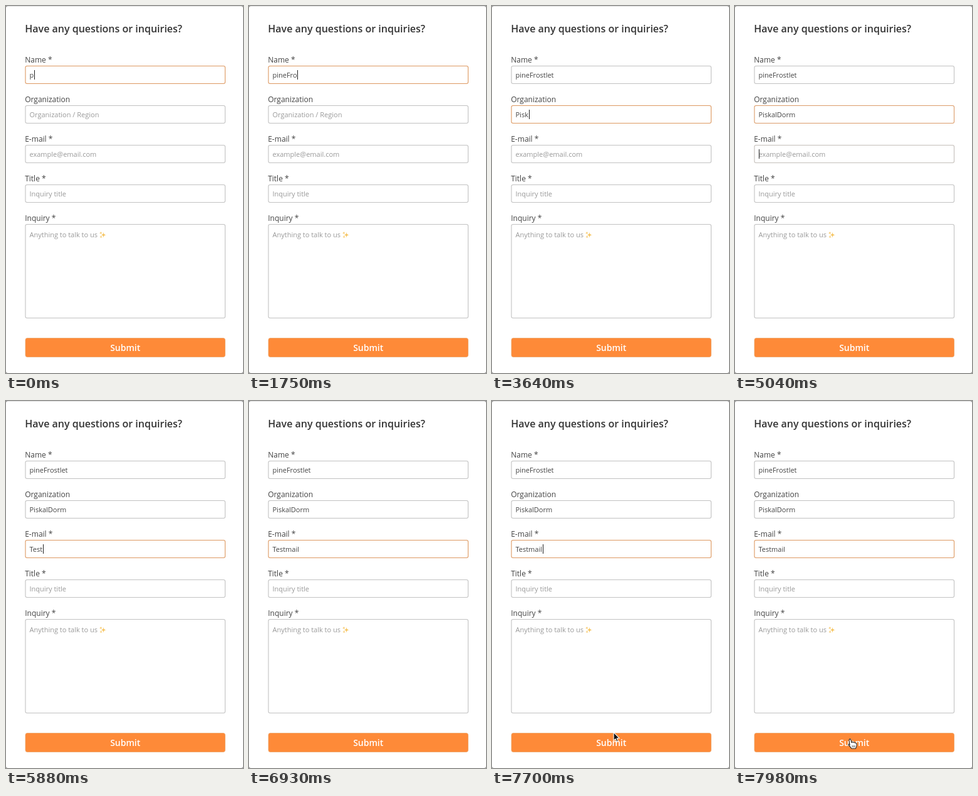
These frames come from a looping animation (378 by 584 pixels, 8000 ms). An HTML page with a canvas:

```html
<!DOCTYPE html>
<html lang="en">
<head>
<meta charset="utf-8">
<title>Inquiry form</title>
<style>
html, body { margin: 0; width: 100%; height: 100%; overflow: hidden; background: #fff; }
canvas { display: block; width: 378px; height: 584px; }
</style>
</head>
<body>
<canvas id="stage" width="378" height="584"></canvas>
<script>
const ctx = document.getElementById('stage').getContext('2d');
const LOOP = 8000, STEP = 70;
const FAMILY = '"Open Sans", "Noto Sans", sans-serif';
const GREY = [194, 194, 194], ORANGE = [221, 153, 98];
const TEXT_X = 37.5;

// keys: the time at which each character appears
const fields = [
  { label: 'Name *', y: 95, h: 28, hint: '', text: 'pineFrostlet', focus: -1000, blur: 2940,
    keys: [0, 420, 840, 980, 1330, 1470, 1750, 1960, 2100, 2240, 2310, 2450] },
  { label: 'Organization', y: 158, h: 28, hint: 'Organization / Region', text: 'PiskalDorm', focus: 2940, blur: 4970,
    keys: [3290, 3360, 3500, 3570, 3710, 3780, 4340, 4480, 4620, 4760] },
  { label: 'E-mail *', y: 221, h: 28, hint: 'example@email.com', text: 'Testmail', focus: 4970, blur: 1e6,
    keys: [5460, 5600, 5740, 5880, 6090, 6160, 6300, 6370] },
  { label: 'Title *', y: 284, h: 28, hint: 'Inquiry title' },
  { label: 'Inquiry *', y: 347, h: 149, hint: 'Anything to talk to us' }
];

// time, x, y of the mouse pointer
const path = [
  [7000, 207, 169], [7070, 207, 222], [7140, 208, 300], [7210, 210, 385], [7280, 211, 442],
  [7420, 209, 474], [7560, 202, 506], [7770, 190, 538], [7980, 187, 545]
];

const clamp = v => Math.max(0, Math.min(1, v));
const smooth = v => v * v * (3 - 2 * v);
const fade = (t, start) => smooth(clamp((t - start - 30) / 230));
const mix = (a, b, k) => `rgb(${a.map((v, i) => Math.round(v + (b[i] - v) * k))})`;

function write(text, x, y, size, color, weight = 400, align = 'left') {
  ctx.font = `${weight} ${size}px ${FAMILY}`;
  ctx.fillStyle = color;
  ctx.textAlign = align;
  ctx.fillText(text, x, y);
}

function box(x, y, w, h, r) {
  ctx.beginPath();
  ctx.roundRect(x, y, w, h, r);
}

function polygon(points) {
  ctx.beginPath();
  points.forEach(([x, y]) => ctx.lineTo(x, y));
  ctx.closePath();
}

function sparkle(x, y, r) {
  ctx.beginPath();
  ctx.moveTo(x, y - r);
  for (const [dx, dy] of [[r, 0], [0, r], [-r, 0], [0, -r]]) {
    ctx.quadraticCurveTo(x, y, x + dx, y + dy);
  }
  ctx.fillStyle = '#f6c766';
  ctx.fill();
}

function caretOn(t) {
  return t < 6930 || (t >= 7490 && t < 7980);
}

function drawField(f, t) {
  const { y, h, text = '', keys = [] } = f;
  write(f.label, 30.2, y - 5, 12, '#444');
  const glow = keys.length ? fade(t, f.focus) - fade(t, f.blur) : 0;
  box(31, y + 0.5, 318.5, h, 2.5);
  ctx.fillStyle = '#fff';
  ctx.fill();
  ctx.strokeStyle = mix(GREY, ORANGE, glow);
  ctx.lineWidth = 1.1;
  ctx.stroke();

  const typed = text.slice(0, keys.filter(k => k <= t).length);
  const baseline = y + (h > 100 ? 21 : 19);
  write(typed || f.hint, TEXT_X, baseline, 11, typed ? '#444' : '#999');
  if (keys.length && t >= f.focus && t < f.blur && caretOn(t)) {
    const x = Math.round(TEXT_X + ctx.measureText(typed).width * (typed ? 1 : 0) + 0.8);
    ctx.fillStyle = '#222';
    ctx.fillRect(x, y + 7, 1, 15);
  }
}

function drawButton() {
  box(31, 528.5, 318.5, 30, 3);
  ctx.fillStyle = '#fe8a38';
  ctx.fill();
  ctx.strokeStyle = '#eba468';
  ctx.lineWidth = 0.8;
  ctx.stroke();
  write('Submit', 190.2, 549, 14, '#fff', 600, 'center');
}

function drawBeam() {
  for (const [color, width] of [['#fff', 3], ['#222', 1.3]]) {
    ctx.beginPath();
    for (const s of [-1, 1]) {
      ctx.moveTo(-3.5, s * 7);
      ctx.quadraticCurveTo(0, s * 7, 0, s * 5);
      ctx.quadraticCurveTo(0, s * 7, 3.5, s * 7);
    }
    ctx.moveTo(0, -5.5);
    ctx.lineTo(0, 5.5);
    ctx.moveTo(-2, 2.5);
    ctx.lineTo(2, 2.5);
    ctx.strokeStyle = color;
    ctx.lineWidth = width;
    ctx.stroke();
  }
}

function outlined(fill, line) {
  ctx.lineJoin = 'round';
  ctx.lineWidth = 1.1;
  ctx.fillStyle = fill;
  ctx.strokeStyle = line;
  ctx.fill();
  ctx.stroke();
}

function drawArrow() {
  polygon([[0, 0], [0, 13], [3, 10.3], [5, 15], [7.2, 14], [5.2, 9.5], [9.2, 9.2]]);
  outlined('#111', '#fff');
}

function drawHand() {
  ctx.beginPath();
  ctx.moveTo(-4, 3);
  ctx.lineTo(-5, -5.5);
  ctx.quadraticCurveTo(-4, -8.5, -2.2, -6);
  ctx.lineTo(-1, -1.5);
  for (const [x, y] of [[2, -1.6], [4.5, -0.8], [7, 0.4]]) {
    ctx.quadraticCurveTo(x - 1, y - 1.8, x, y);
  }
  ctx.quadraticCurveTo(7.8, 4, 5.5, 8);
  ctx.lineTo(-1.2, 8);
  ctx.quadraticCurveTo(-3, 5, -6, 2.6);
  ctx.quadraticCurveTo(-6.5, 0, -4, 1.8);
  ctx.closePath();
  outlined('#fff', '#222');
  ctx.lineWidth = 0.7;
  ctx.beginPath();
  for (const x of [0, 2, 4]) {
    ctx.moveTo(x, 3);
    ctx.lineTo(x + 0.1, 6);
  }
  ctx.stroke();
}

function drawPointer(t) {
  if (t < path[0][0]) return;
  let i = 0;
  while (i < path.length - 2 && path[i + 1][0] <= t) i++;
  const [t0, x0, y0] = path[i], [t1, x1, y1] = path[i + 1];
  const k = clamp((t - t0) / (t1 - t0));
  const x = x0 + (x1 - x0) * k, y = y0 + (y1 - y0) * k;
  const overField = fields.some(f => y >= f.y && y <= f.y + f.h);
  ctx.save();
  ctx.translate(x, y);
  if (y > 528) drawHand();
  else if (overField) drawBeam();
  else drawArrow();
  ctx.restore();
}

function draw(t) {
  ctx.fillStyle = '#888';
  ctx.fillRect(0, 0, 378, 584);
  box(0, 0.3, 378, 583.7, 3);
  ctx.fillStyle = '#fff';
  ctx.fill();
  write('Have any questions or inquiries?', 30.3, 42, 16, '#333', 600);
  fields.forEach(f => drawField(f, t));
  sparkle(155.5, 364.2, 4.8);
  sparkle(151.3, 361.2, 2.4);
  sparkle(151.6, 367.3, 2.4);
  drawButton();
  drawPointer(t);
}

const start = performance.now();
function tick() {
  const t = (performance.now() - start) % LOOP;
  draw(Math.floor(t / STEP) * STEP);
  requestAnimationFrame(tick);
}
tick();
</script>
</body>
</html>
```
